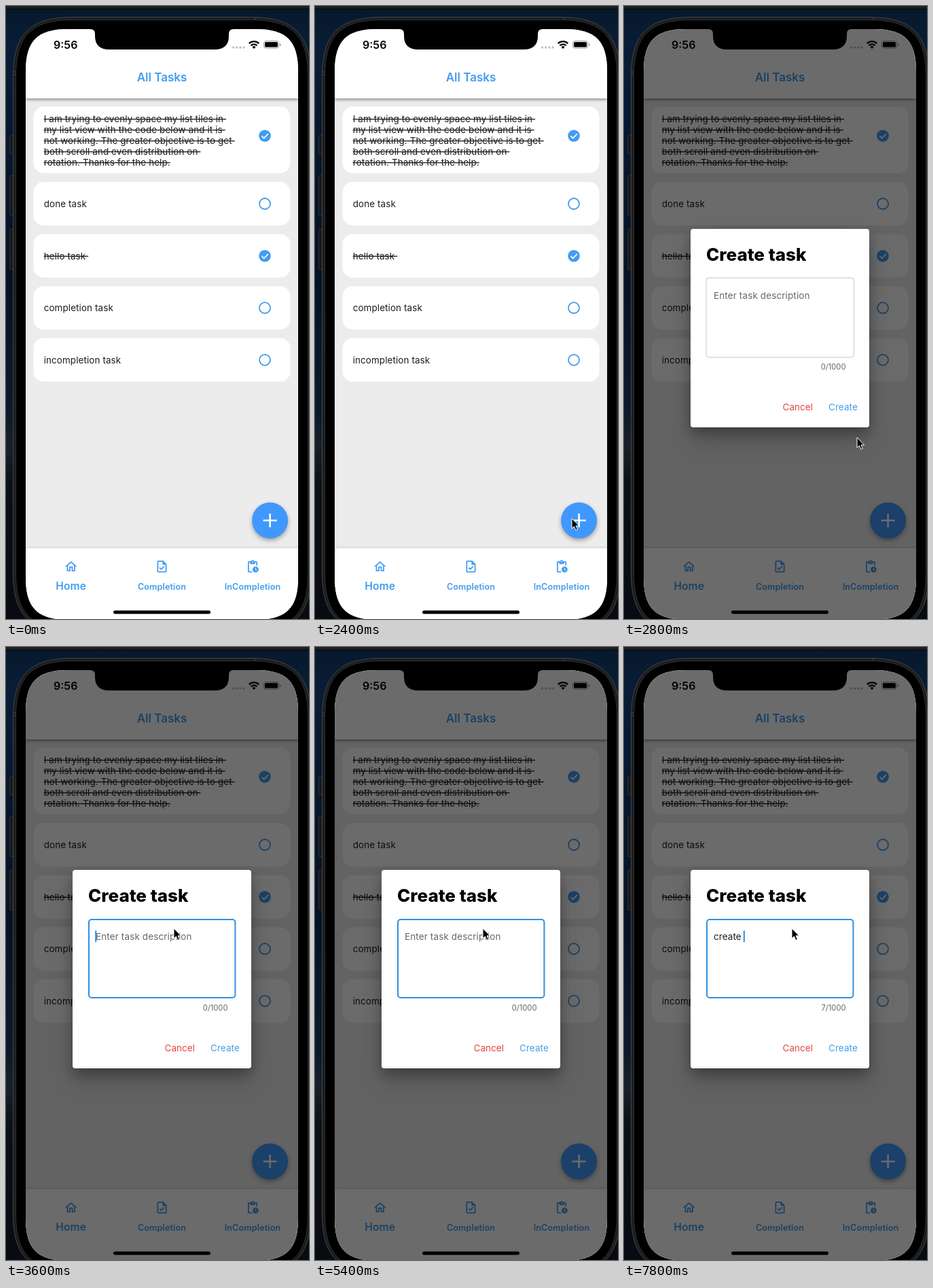
Animation of 446x902 px, one loop 8 s. Source, as an HTML page:

```html
<!DOCTYPE html>
<html lang="en">
<head>
<meta charset="utf-8">
<title>Task list</title>
<style>
html, body { margin: 0; width: 100%; height: 100%; overflow: hidden; background: #05101f; }
svg { display: block; width: 100vw; height: 100vh; }
text { font: 13.4px Inter, "Open Sans", sans-serif; letter-spacing: .12px; fill: #1c1c1c; }
.done { text-decoration: line-through; text-decoration-thickness: 1px; }
.blue { fill: #429cf0; }
.mid { text-anchor: middle; }
.head { font-size: 17px; font-weight: 600; letter-spacing: 0; }
.tab { font-size: 12.6px; font-weight: 600; }
.home { font-size: 15.6px; font-weight: 600; }
.clock { font-size: 16px; font-weight: 600; letter-spacing: 0; fill: #000; }
.title { font-size: 26px; font-weight: 800; letter-spacing: 0; fill: #000; }
.count { font-size: 11.2px; letter-spacing: 0; text-anchor: end; fill: #666; }
.hint { fill: #666; letter-spacing: .17px; }
#bar { filter: drop-shadow(0 2px 2px rgba(0,0,0,.4)); }
#nav { filter: drop-shadow(0 -1px 2px rgba(0,0,0,.1)); }
#fab { filter: drop-shadow(0 3px 3px rgba(0,0,0,.32)); }
#sheet { filter: drop-shadow(0 9px 9px rgba(0,0,0,.28)) drop-shadow(0 18px 18px rgba(0,0,0,.16)); }
</style>
</head>
<body>
<svg viewBox="0 0 446 902">
  <defs>
    <linearGradient id="sky" x2="0" y2="1">
      <stop stop-color="#07182c"/><stop offset=".06" stop-color="#081d35"/>
      <stop offset=".2" stop-color="#061830"/><stop offset=".45" stop-color="#041225"/>
      <stop offset=".66" stop-color="#0a1a2b"/><stop offset=".72" stop-color="#182029"/>
      <stop offset=".78" stop-color="#0a1017"/><stop offset="1" stop-color="#080b11"/>
    </linearGradient>
    <clipPath id="screen"><path id="glass"/></clipPath>
  </defs>

  <rect width="446" height="902" fill="url(#sky)"/>
  <rect width="446" height="4" fill="#1d1e20"/>
  <path d="M0 4.5H446" stroke="#050607"/>

  <!-- phone body -->
  <g fill="#19191a" stroke="#2c2e30">
    <rect x="5.5" y="190.5" width="6" height="27" rx="1.5"/>
    <rect x="5.5" y="249.5" width="6" height="59" rx="1.5"/>
    <rect x="5.5" y="328.5" width="6" height="59" rx="1.5"/>
  </g>
  <path id="frame" fill="#1b1c1d" stroke="#454749"/>
  <path d="M11 97h4M11 101h4M367 17v4" stroke="#4b4d4f"/>
  <path id="bezel" stroke="#303132"/>

  <g clip-path="url(#screen)">
    <rect x="29" y="34" width="401" height="869" fill="#ececec"/>
    <g id="cards"></g>
    <g id="fab">
      <circle cx="388.6" cy="757" r="26.5" fill="#4098fd"/>
      <path d="M378.6 757h20M388.6 747v20" stroke="#fff" stroke-width="2.6"/>
    </g>
    <rect id="bar" x="29" y="34" width="401" height="102" fill="#fff"/>
    <text class="head blue mid" x="229.5" y="111">All Tasks</text>
    <rect id="nav" x="29" y="798" width="401" height="105" fill="#fff"/>
    <g id="icons" class="blue"></g>
    <text class="home blue mid" x="95.7" y="859">Home</text>
    <text class="tab blue mid" x="229.5" y="859">Completion</text>
    <text class="tab blue mid" x="363" y="859">InCompletion</text>
    <rect id="shade" x="29" y="34" width="401" height="869"/>
    <rect x="158" y="889.5" width="143" height="5" rx="2.5"/>
  </g>

  <!-- notch and status bar -->
  <path d="M124 32V34Q131 34 131 41V44Q131 64 152 64H307Q328 64 328 44V41Q328 34 335 34V32Z"/>
  <text class="clock" x="70" y="63">9:56</text>
  <path d="M334.5 61h16" stroke="#000" stroke-opacity=".26" stroke-width="3.4" stroke-linecap="round" stroke-dasharray="0 5.2"/>
  <path d="M357.8 55.2a10.2 10.2 0 0 1 14.4 0M360.4 58.3a6.5 6.5 0 0 1 9.2 0" fill="none" stroke="#000" stroke-width="2.3"/>
  <path d="M365 63l-2.5-2.7a3.6 3.6 0 0 1 5 0z"/>
  <rect x="379.5" y="51.5" width="22" height="10.5" rx="3" fill="none" stroke="#000" stroke-opacity=".4"/>
  <rect x="381" y="53" width="19" height="7.5" rx="1.6"/>
  <path d="M403 55v4q1.6-.6 1.6-2t-1.6-2" fill-opacity=".45"/>

  <g id="dialog">
    <rect id="sheet" x="98" y="328" width="263" height="292" rx="4" fill="#fff"/>
    <text class="title" x="121" y="375">Create task</text>
    <rect id="field" rx="4" fill="none"/>
    <text id="hint" class="hint" x="132" y="430.5">Enter task description</text>
    <text id="typed" x="132" y="430.5"></text>
    <rect id="caret" y="417" width="2" height="17.5" rx="1" fill="#2f8de0"/>
    <text id="count" class="count" x="326.5" y="535"></text>
    <text x="233.5" y="595" style="fill:#e5443c">Cancel</text>
    <text class="blue" x="301" y="595">Create</text>
  </g>

  <path id="pointer" d="M0 0V15L3.4 11.8 5.9 17.4 8.4 16.3 6 10.9H10.6Z" stroke="#fff" stroke-width="1" stroke-linejoin="round"/>
</svg>
<script>
const $ = id => document.getElementById(id);
const set = (id, attrs) => { for (const k in attrs) $(id).setAttribute(k, attrs[k]); };
const clamp = v => Math.max(0, Math.min(1, v));

// rectangle with smooth corners that reach r along each side
function smoothRect(x, y, w, h, r) {
  const c = r * .72, s = w - 2 * r, v = h - 2 * r;
  return `M${x + r} ${y}h${s}c${c} 0 ${r} ${r - c} ${r} ${r}v${v}c0 ${c} ${c - r} ${r} ${-r} ${r}` +
    `h${-s}c${-c} 0 ${-r} ${c - r} ${-r} ${-r}v${-v}c0 ${-c} ${r - c} ${-r} ${r} ${-r}z`;
}
set('frame', { d: smoothRect(10.5, 16.5, 438, 905, 88) });
set('bezel', { d: smoothRect(14.5, 20.5, 430, 897, 83) });
set('glass', { d: smoothRect(29, 34, 401, 869, 62) });

// top, height, checked, lines
const tasks = [
  [148, 98, true, ['I am trying to evenly space my list tiles in ', 'my list view with the code below and it is ',
    'not working. The greater objective is to get ', 'both scroll and even distribution on ', 'rotation. Thanks for the help.']],
  [259, 64, false, ['done task']],
  [335.7, 64, true, ['hello task ']],
  [412.2, 64, false, ['completion task']],
  [488.8, 64, false, ['incompletion task']]
];
$('cards').innerHTML = tasks.map(([y, h, checked, lines]) => {
  const long = lines.length > 1;
  const cy = y + h / 2, markY = cy - (long ? 6 : 0);
  const first = cy + (long ? 5.9 : 4.9) - 8 * (lines.length - 1);
  const mark = checked
    ? `<circle cx="381" cy="${markY}" r="8.8" class="blue"/>
       <path d="M376.4 ${markY + .3}l3.3 3.3 6.2-6.4" fill="none" stroke="#fff" stroke-width="1.7"/>`
    : `<circle cx="381" cy="${markY}" r="8" fill="none" stroke="#429cf0" stroke-width="1.8"/>`;
  return `<rect x="40.5" y="${y}" width="378" height="${h}" rx="15" fill="#fff"/>${mark}` +
    lines.map((s, i) => `<text x="55.7" y="${first + 16 * i}" class="${checked ? 'done' : ''}">${s.replace(/ $/, '\u00a0')}</text>`).join('');
}).join('');

const icons = [
  [95.7, 'M12 5.69l5 4.5V18h-2v-6H9v6H7v-7.81l5-4.5M12 3L2 12h3v8h6v-6h2v6h6v-8h3z'],
  [229.5, 'M14 2H6c-1.1 0-2 .9-2 2v16c0 1.1.9 2 2 2h12c1.1 0 2-.9 2-2V8zm4 18H6V4h7v5h5zM8.82 13.05L7.4 14.46 10.94 18l5.66-5.66-1.41-1.41-4.24 4.24z'],
  [363, 'M17 12a5 5 0 1 0 0 10 5 5 0 0 0 0-10zm1.65 7.35L16.5 17.2V14h1v2.79l1.85 1.85zM18 3h-3.18a3 3 0 0 0-5.64 0H6c-1.1 0-2 .9-2 2v15c0 1.1.9 2 2 2h6.11a6.7 6.7 0 0 1-1.42-2H6V5h2v3h8V5h2v5.08c.71.1 1.38.31 2 .6V5c0-1.1-.9-2-2-2zm-6 2a1 1 0 1 1 0-2 1 1 0 0 1 0 2z']
];
$('icons').innerHTML = icons.map(([x, d]) =>
  `<path fill-rule="evenodd" transform="translate(${x} 824.8) scale(.88) translate(-12 -12)" d="${d}"/>`).join('');

// time, x, y of the pointer tip
const path = [[1000, -12, 330], [1300, 180, 285], [1400, 200, 289], [1800, 290, 500], [2200, 372, 735],
  [2400, 378, 754], [2600, 378, 754], [2800, 343, 635], [3000, 300, 515], [3200, 262, 440], [3400, 247, 414]];
// time, letters typed
const typing = [[6400, 1], [6800, 2], [7200, 3], [7400, 4], [7600, 6], [7800, 7]];

function pointerAt(t) {
  const i = path.findIndex(p => p[0] > t);
  if (i < 0) return path[path.length - 1].slice(1);
  if (i === 0) return [-50, -50];
  const [a, b] = [path[i - 1], path[i]], k = (t - a[0]) / (b[0] - a[0]);
  return [a[1] + (b[1] - a[1]) * k, a[2] + (b[2] - a[2]) * k];
}

function draw(t) {
  const open = t >= 2800 ? 1 : t >= 2600 ? .6 : 0;
  set('shade', { opacity: open === 1 ? .58 : open ? .44 : 0 });
  set('dialog', { opacity: open });
  set('pointer', { transform: `translate(${pointerAt(t)})` });

  const focus = t >= 3600;
  set('field', focus
    ? { x: 122, y: 401, width: 215.4, height: 115, stroke: '#328fe0', 'stroke-width': 2 }
    : { x: 121, y: 400, width: 217.4, height: 117, stroke: '#c6c6c6', 'stroke-width': 1 });

  const n = typing.reduce((m, [at, k]) => t >= at ? k : m, 0);
  $('typed').textContent = 'create\u00a0'.slice(0, n);
  $('count').textContent = n + '/1000';
  set('hint', { opacity: t < 6400 ? 1 : t < 6600 ? .12 : 0 });
  const blink = t <= 4000 || n ? 1 : clamp(.3 + Math.cos(t * Math.PI / 500));
  set('caret', { x: 131.2 + (n ? $('typed').getComputedTextLength() : 0), opacity: focus ? blink : 0 });
}

// the picture advances in 200 ms steps
const start = performance.now();
(function tick() {
  const t = (performance.now() - start) % 8000;
  draw(Math.floor(t / 200) * 200);
  requestAnimationFrame(tick);
})();
</script>
</body>
</html>
```
